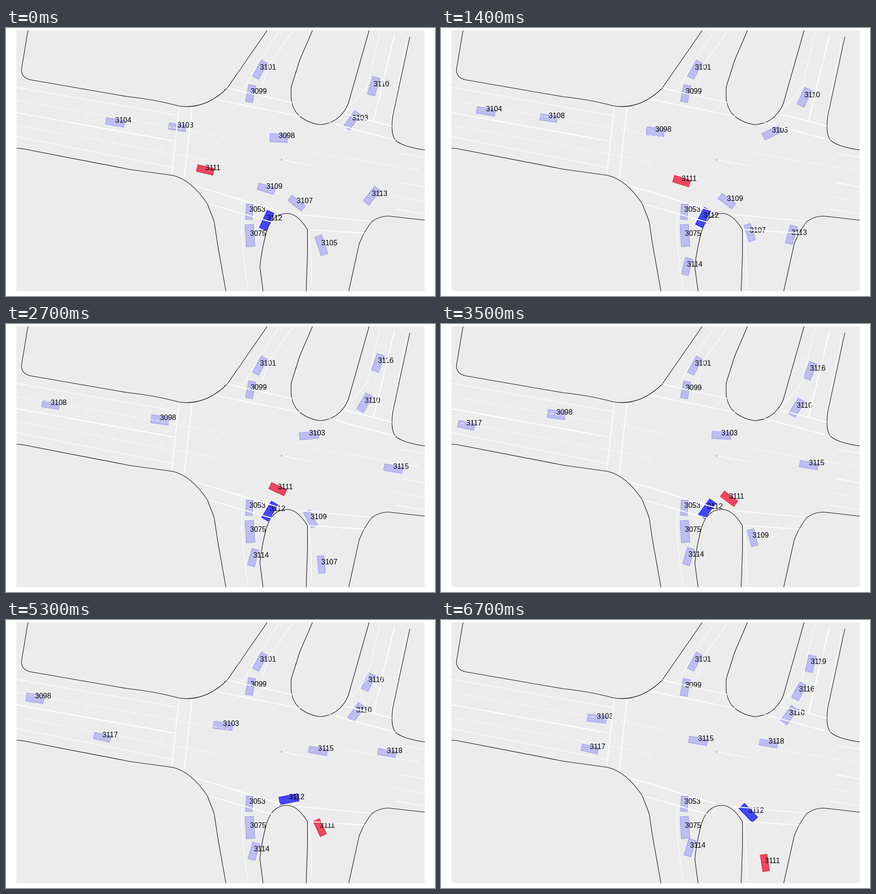
These frames come from a looping animation (947 by 592 pixels, 6.8 s). An HTML page:

```html
<!DOCTYPE html>
<html lang="en">
<head>
<meta charset="utf-8">
<title>Intersection traffic</title>
<style>
  html, body { margin: 0; width: 100%; height: 100%; overflow: hidden; background: #fff; }
  svg { display: block; width: 947px; height: 592px; }
  path { fill: none; }
  .curb { stroke: #000; stroke-width: 1.1; stroke-linejoin: round; }
  .mark { stroke: #fff; stroke-width: 2.2; }
  .thin { stroke: #fff; stroke-width: 1.3; }
  .dash { stroke: #fff; stroke-width: 1.1; stroke-dasharray: 8 5; }
  .car { fill: #00f; stroke: #00f; fill-opacity: .2; stroke-opacity: .2; stroke-width: 1.5; }
  .ego { fill-opacity: .7; stroke-opacity: .7; }
  .alert { fill: #ee0026; stroke: #dc1432; fill-opacity: .7; stroke-opacity: .7; }
  text { font: 16px "Liberation Sans", Arial, sans-serif; fill: #000; }
</style>
</head>
<body>
<svg viewBox="0 0 947 592">
  <rect x="23" y="5" width="901" height="576" fill="#ececec"/>
  <g class="curb" transform="translate(.5 .5)">
    <path d="M48 5L33.5 92Q34 110 54 114L267 151Q325 156.5 382 172Q440 180 488 132L576 5"/>
    <path d="M676 5L648 70L629 130V155Q632 182 650 196T692 213Q735 211 755 167L801 5"/>
    <path d="M891 19L853 195Q848 235 860 248Q876 262 924 269"/>
    <path d="M23 265L35 266L273 312L367 325Q408 334 444 388L459 427L467 480L485 581"/>
    <path d="M567 581L560 528Q562 500 573 455Q585 409 620 409Q643 409 665 445V500L662 581"/>
    <path d="M756 581L779 477Q789 450 807 427Q825 414 845 415L924 424"/>
  </g>
  <g id="cars"></g>
  <g class="dash">
    <path d="M23 160L490 241M30 216L462 295"/>
    <path d="M682 275L915 315M852 371L924 383"/>
  </g>
  <g id="labels"></g>
  <g class="mark">
    <path d="M382.5 173L366 322M411 174L393 334"/>
    <path d="M488 133L633 165M459 157L649 195"/>
    <path d="M748 190L852 217M714 209L860 248"/>
    <path d="M415 348L606 406M445 388L588 429"/>
    <path d="M645 412L807 427M666 445L791 453"/>
    <path d="M23 187L372 250M858 14L811 206"/>
  </g>
  <g class="thin">
    <path d="M23 131L378 193M23 240L367 308"/>
    <path d="M604 5L563 68L522 137M634 5L583 77L566 125"/>
    <path d="M826 9L797 130L748 188M884 25L848 215"/>
    <path d="M522 410Q516 460 535 581M668 445Q674 490 675 581"/>
    <path d="M608 291L682 305M874 277L924 286M873 342L924 351M860 400L924 411"/>
  </g>
  <circle cx="608.5" cy="291.5" r="1" fill="#222"/>
</svg>
<script>
const LOOP = 6.7 + 0.1, STEP = 0.1;
const moving = [];

function make(tag, attrs, parent) {
  const el = document.createElementNS("http://www.w3.org/2000/svg", tag);
  for (const key in attrs) el.setAttribute(key, attrs[key]);
  if (parent) document.getElementById(parent).appendChild(el);
  return el;
}

function vehicle(id, length, width, kind = "") {
  const box = make("rect", {
    class: "car " + kind, x: -length / 2, y: -width / 2, width: length, height: width
  }, "cars");
  const label = make("text", {}, "labels");
  label.textContent = id;
  return { box, label };
}

function place({ box, label }, x, y, angle) {
  box.setAttribute("transform", `translate(${x} ${y}) rotate(${angle})`);
  label.setAttribute("x", x);
  label.setAttribute("y", y);
}

function parked(id, length, width, x, y, angle) {
  place(vehicle(id, length, width), x, y, angle);
}

// Follows a route from time t0 to t1; v0 and v1 are the end speeds in px/s,
// and tail is how far behind the centre the heading is taken.
function drive(id, length, width, t0, t1, route, { v0, v1, kind, tail = 1 } = {}) {
  const path = make("path", { d: route });
  const total = path.getTotalLength(), mean = total / (t1 - t0);
  moving.push({
    ...vehicle(id, length, width, kind), t0, t1, path, total, tail, v0: v0 ?? mean, v1: v1 ?? mean
  });
}

function distance({ t0, t1, total, v0, v1 }, t) {
  const span = t1 - t0, u = (t - t0) / span, w = 1 - u;
  const d = total * u * u * (3 - 2 * u) + span * u * w * (v0 * w - v1 * u);
  return Math.min(Math.max(d, 0), total);
}

parked(3101, 41, 15.5, 560.5, 92, 118);
parked(3053, 34, 15, 537, 406, 93);
parked(3075, 49, 19, 538.5, 458.5, 86.5);

drive(3099, 38, 16, 0, 6.7, "M540 145L539.2 149", { v0: 0, v1: 1.8 });

// Westbound
drive(3104, 41, 15, 0, 1.9, "M241 208.5L48.5 175.5");
drive(3108, 38, 14, 0, 3.2, "M378 219.5L44 171", { v0: 96, v1: 110 });
drive(3098, 39, 18, 0, 5.5, "M602 243Q523 239.5 43.5 170", { v0: 85, v1: 103 });
drive(3115, 41, 14.5, 1.6, 6.7, "M901 328L567.5 267", { v0: 36, v1: 96 });
drive(3118, 40, 14, 4.8, 6.7, "M893 303L723 273", { v0: 115, v1: 80 });

// Eastbound
drive(3117, 37, 15, 3.4, 6.7, "M47 222L328.5 285", { v0: 90, v1: 82 });

// From the north
drive(3103, 42, 16, 0, 6.7, "M764 203.7Q736 243 660 247Q600 249.5 344 218", { v0: 22, v1: 105 });
drive(3110, 41, 17, 0, 6.7, "M811.5 128.5Q800.5 165 768.5 210", { v0: 18.5, v1: 2 });
drive(3116, 39, 17, 1.5, 6.7, "M829.5 57Q819 100 790 157.5", { v0: 26, v1: 14 });
drive(3119, 37, 17, 5.5, 6.7, "M823.5 65L816 96.5");

// Leaving to the south
drive(3105, 44, 16, 0, 1, "M696 480Q701.3 495.5 706.8 540");
drive(3107, 38, 15, 0, 2.9, "M641.5 387Q689 424 697 544", { v0: 50, v1: 64 });
drive(3109, 38, 15, 0, 4.6, "M574.5 355Q696 390 695.5 542", { v0: 45, v1: 70 });
drive(3113, 41, 16.5, 0, 2.5, "M807.5 370.5Q785 398 752 542", { v0: 54, v1: 82 });

// From the south
drive(3114, 38, 16, 1.3, 6.7, "M542.5 528Q545.5 516 549.5 503", { v0: 14, v1: 10 });

drive(3111, 37, 15, 0, 6.7, "M440 313.5Q545 338 600 365Q695 407 715 536.5",
  { v0: 75, v1: 63, kind: "alert" });
drive(3112, 42, 16.5, 0, 6.7, "M575.5 425C580 415 589 396 630.5 395.5Q655 396 678.5 426",
  { v0: 8, v1: 60, kind: "ego", tail: 25 });

function draw(seconds) {
  const t = Math.floor((seconds % LOOP) / STEP + 1e-6) * STEP;
  for (const car of moving) {
    const shown = t > car.t0 - STEP / 2 && t < car.t1 + STEP / 2;
    car.box.style.display = car.label.style.display = shown ? "" : "none";
    if (!shown) continue;
    const d = distance(car, t), at = s => car.path.getPointAtLength(s);
    const here = at(d), back = at(Math.max(d - car.tail, 0)), front = at(Math.min(d + 1, car.total));
    const angle = Math.atan2(front.y - back.y, front.x - back.x) * 180 / Math.PI;
    place(car, here.x, here.y, angle);
  }
}

const start = performance.now();
function tick() {
  draw((performance.now() - start) / 1000);
  requestAnimationFrame(tick);
}
tick();
</script>
</body>
</html>
```
